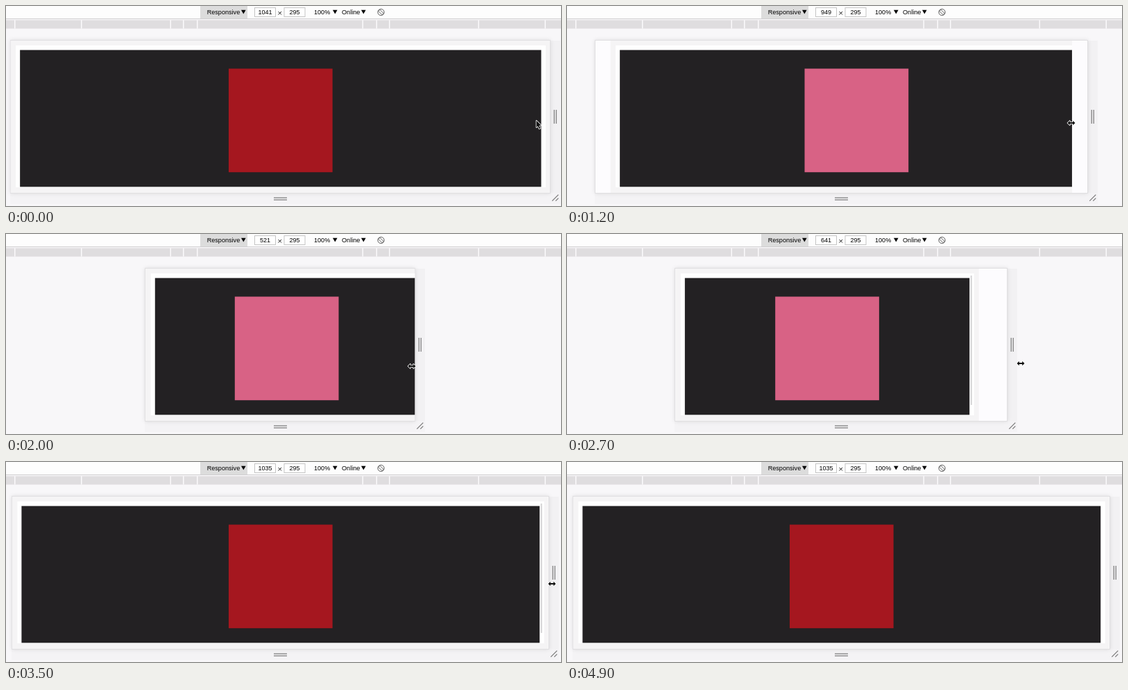
Animation, 800 px wide and 289 px high, one loop 5000 ms. Source, as an HTML page with a canvas:

```html
<!DOCTYPE html>
<html lang="en">
<head>
<meta charset="utf-8">
<title>Responsive square</title>
<style>
html, body { margin: 0; width: 100%; height: 100%; overflow: hidden; }
canvas { display: block; }
</style>
</head>
<body>
<canvas id="stage" width="800" height="289"></canvas>
<script>
const ctx = document.getElementById('stage').getContext('2d');
const LOOP = 5000, STEP = 100, SCALE = 0.7486, MID = 395.3;
const LAYOUT_LAG = 50, PAINT_LEAD = 80; // ms
const BREAKPOINT = 1024;
const GREY = '#777';

// key points: [time, value...], linear in between
const widths = [
  [800, 1041], [1150, 949], [1200, 949], [1400, 805], [2000, 521], [2080, 521], [2110, 490],
  [2500, 490], [2600, 530], [2700, 641], [3050, 972], [3100, 987], [3400, 1035]
];
const pointer = [
  [0, 764, 165], [300, 791, 165], [800, 791, 165], [1200, 727, 169], [2000, 585, 191],
  [2500, 580, 190], [2700, 654, 187], [3100, 773, 176], [3500, 787, 176],
  [4000, 787, 176], [4600, 713, 48]
];

function track(keys, t) {
  const i = keys.findIndex(key => key[0] > t);
  if (i < 1) return keys.at(i).slice(1);
  const [t1, ...from] = keys[i - 1], [t2, ...to] = keys[i];
  return from.map((v, n) => v + (to[n] - v) * (t - t1) / (t2 - t1));
}

const widthAt = t => track(widths, t)[0];
const edge = w => MID + w * SCALE / 2;

function box(x1, y1, x2, y2, color) {
  ctx.fillStyle = color;
  ctx.fillRect(x1, y1, x2 - x1, y2 - y1);
}

function line(x1, y1, x2, y2, color = GREY, width = 1.2) {
  ctx.strokeStyle = color;
  ctx.lineWidth = width;
  ctx.beginPath();
  ctx.moveTo(x1, y1);
  ctx.lineTo(x2, y2);
  ctx.stroke();
}

function label(text, x, align = 'left') {
  ctx.font = '9.1px "Liberation Sans", Arial, sans-serif';
  ctx.fillStyle = '#000';
  ctx.textAlign = align;
  ctx.fillText(text, x, 12);
}

function menu(text, x, arrowX) {
  label(text, x);
  ctx.fill(new Path2D(`M${arrowX} 5.7h6.6l-3.3 5.8z`));
}

function field(x, value) {
  box(x, 2, x + 31, 16, '#c4c4c4');
  box(x + 1, 3, x + 30, 15, '#fff');
  label(value, x + 15.5, 'center');
}

function toolbar(width) {
  box(0, 0, 800, 18, '#fdfdfd');
  box(0, 18, 800, 19, '#cfcdd0');
  box(280, 0, 348, 18, '#dcdcdc');
  menu('Responsive', 289.7, 339);
  menu('100%', 444, 471);
  menu('Online', 484, 512);
  field(358, Math.round(width));
  field(400.5, 295);
  line(392.5, 8, 397, 12.5, '#222', 1);
  line(397, 8, 392.5, 12.5, '#222', 1);

  // rotate button
  ctx.save();
  ctx.translate(540.5, 9);
  ctx.rotate(-Math.PI / 4);
  ctx.strokeStyle = '#555';
  ctx.lineWidth = 0.9;
  ctx.beginPath();
  ctx.arc(0, 0, 4.6, 0, 7);
  ctx.rect(-1.5, -3.7, 3, 7.4);
  ctx.stroke();
  ctx.restore();

  // media query bar, symmetric marks
  box(0, 20.4, 800, 32.6, '#dfdddf');
  for (const x of [12, 108, 236.5, 255, 275]) {
    for (const mark of [x, 788.5 - x]) box(mark, 20.4, mark + 1.5, 32.6, '#fbfafc');
  }
}

function page(left, layout, scrollbar) {
  const right = left + layout * SCALE;
  const x1 = left + 14.5, x2 = right - 13.5;
  const mid = (x1 + x2) / 2, half = 100 * SCALE;
  box(left, 50, right, 270, '#f5f4f5');
  box(left + 8.5, 57, right - 7, 262, '#fff');
  box(x1, 63.6, x2, 261.3, '#232123');
  box(mid - half, 90.5, mid + half, 240.2, layout > BREAKPOINT ? '#a5171f' : '#d86285');
  if (scrollbar) box(right - 12, 60, right - 10, 247, '#d4d3d5');
}

function device(t, width) {
  const left = Math.round(edge(-width)), right = Math.round(edge(width));
  const painted = Math.min(width, widthAt(t + PAINT_LEAD));

  box(right, 50, right + 14, 270, '#f2f1f3');
  box(left, 270, right + 14, 286, '#f4f3f5');
  ctx.save();
  ctx.shadowColor = 'rgba(0,0,0,.1)';
  ctx.shadowBlur = 6;
  box(left, 49, right, 271, '#e0dfe1');
  ctx.restore();
  box(left + 1, 50, right - 1, 270, '#fdfcfe');

  ctx.save();
  ctx.beginPath();
  ctx.rect(edge(-painted) + 1, 50, painted * SCALE - 2, 220);
  ctx.clip();
  page(edge(-painted), widthAt(t - LAYOUT_LAG), t >= 2600 && t < 3900);
  ctx.restore();

  // drag handles
  for (const d of [0, 3]) {
    line(right + 5.2 + d, 150, right + 5.2 + d, 170);
    line(386, 277.1 + d, 405, 277.1 + d);
  }
  for (const size of [9, 4]) line(right + 11.3 - size, 281.7, right + 11.3, 281.7 - size);
}

function cursor(x, y, resizing) {
  const outline = new Path2D(resizing
    ? 'M-5.5 0l3.3-3.3v2.4h4.4v-2.4L5.5 0 2.2 3.3V.9h-4.4v2.4z'
    : 'M.5.5v10l2.2-2.1 1.8 4.1 1.7-.8-1.7-3.9 3-.2z');
  ctx.save();
  ctx.translate(x, y);
  ctx.lineJoin = 'round';
  ctx.lineWidth = 1.6;
  ctx.strokeStyle = '#fff';
  ctx.stroke(outline);
  ctx.fillStyle = '#111';
  ctx.fill(outline);
  ctx.restore();
}

function draw() {
  const t = Math.floor(performance.now() % LOOP / STEP) * STEP;
  const width = widthAt(t);
  box(0, 0, 800, 289, '#f8f7f9');
  toolbar(width);
  device(t, width);
  if (t < 4700) cursor(...track(pointer, t), t >= 300 && t < 4100);
  requestAnimationFrame(draw);
}
draw();
</script>
</body>
</html>
```
